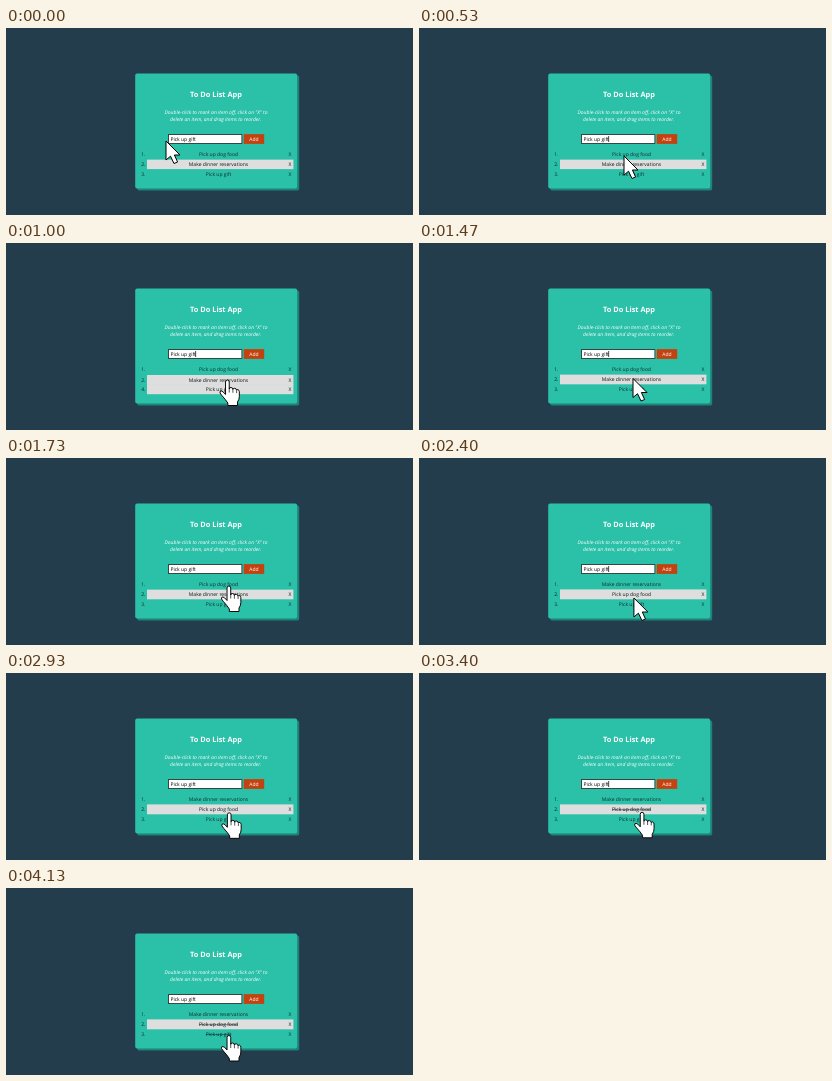
These frames come from a looping animation (407x187 px, 4190 ms). An HTML page:

```html
<!DOCTYPE html>
<html lang="en">
<head>
<meta charset="utf-8">
<title>To Do List App</title>
<style>
  html, body { margin: 0; width: 100%; height: 100%; overflow: hidden; background: #243d4d; }
  svg { display: block; width: 407px; height: 187px; }
  text { font: 5px "Open Sans", sans-serif; fill: #0c1514; text-rendering: geometricPrecision; }
  .mid { text-anchor: middle; }
  .title { font-size: 7.4px; font-weight: 700; fill: #fff; }
  .hint { font-size: 5px; font-style: italic; fill: #fff; }
  .entry { fill: #000; }
  .add { fill: #fff; }
  .cursor path { fill: #fff; stroke: #000; stroke-width: 1; stroke-linejoin: round; }
</style>
</head>
<body>
<svg viewBox="0 0 407 187">
  <rect width="407" height="187" fill="#243d4d"/>
  <rect x="131.2" y="47.4" width="162" height="115" rx="2" fill="#1c8478"/>
  <rect x="129.2" y="45.4" width="162" height="115" rx="2" fill="#2bc0a8"/>
  <text class="mid title" x="210" y="69.2">To Do List App</text>
  <text class="mid hint" x="210" y="86">Double-click to mark an item off, click on "X" to</text>
  <text class="mid hint" x="209.8" y="92.6">delete an item, and drag items to reorder.</text>
  <rect x="162.5" y="106.6" width="73.4" height="8.9" fill="#fff" stroke="#222" stroke-width=".8"/>
  <text class="entry" x="164.4" y="112.8">Pick up gift</text>
  <rect id="caret" x="189.4" y="108" width=".7" height="6" fill="#000"/>
  <rect x="237.7" y="106.1" width="20.5" height="9.8" fill="#c4420f"/>
  <text class="mid add" x="248" y="112.8">Add</text>
  <g id="list"></g>
  <g id="cursor" class="cursor">
    <path id="arrow" d="M0 0V19L4.5 15.2L8 22.5L11.6 21L8.4 14H14Z"/>
    <g id="hand" transform="translate(.6 0) scale(.92 1)">
      <path d="M7 15V2.5a2 2 0 0 1 4 0V9.5q0-1.6 2-1.5t2 2q0-1.5 2-1.2t2 2q.3-1 1.6-.6t1.4 2V17q0 3-2 5.5V26H9.5V23.5Q7 20 3 16L1 13.5Q.5 11.5 2.5 11.5Q4 11.5 7 15Z"/>
      <path d="M11 9.5V13M15 10V13.3M19 11V13.6" stroke-opacity=".7"/>
    </g>
  </g>
</svg>
<script>
const LOOP = 4190, STEP = 1000 / 15, ROW = 9.9, TOP = 121.5;
const $ = id => document.getElementById(id);

// Pointer path: step, x, y
const path = [
  [0, 160, 113], [8, 205, 128], [9, 209, 133], [10, 212, 136], [11, 213, 136.5],
  [15, 212.5, 136.5], [16, 213, 137], [20, 214, 144], [21, 214, 144], [22, 214, 135.5],
  [26, 214, 127.5], [30, 214, 127.5], [33, 213, 137.5], [35, 215, 140], [40, 214.5, 140],
  [47, 214.2, 138.8], [51, 214.2, 138.8], [55, 214, 147]
];

function pointer(k) {
  const i = path.findIndex(p => p[0] > k);
  if (i < 0) return path[path.length - 1].slice(1);
  const [a, b] = [path[i - 1], path[i]];
  const u = (k - a[0]) / (b[0] - a[0]);
  return [a[1] + (b[1] - a[1]) * u, a[2] + (b[2] - a[2]) * u];
}

const within = (k, from, to) => k >= from && k < to;

function makeItem(label) {
  const g = document.createElementNS("http://www.w3.org/2000/svg", "g");
  g.innerHTML = `<rect x="141" width="146.4" height="9.9"/>
    <g><text x="135.2" y="6.8"></text>
    <text class="mid" x="212.5" y="6.8">${label}</text>
    <text class="mid" x="284" y="6.8">X</text></g>`;
  $("list").append(g);
  const [bar, words] = g.children;
  const [num, text] = words.children;
  return { g, bar, words, num, text };
}

const dog = makeItem("Pick up dog food");
const dinner = makeItem("Make dinner reservations");
const gift = makeItem("Pick up gift");

function place(item, n, y, struck) {
  item.g.setAttribute("transform", `translate(0 ${y})`);
  item.bar.setAttribute("fill", n % 2 ? "#2bc0a8" : "#dedede");
  item.words.setAttribute("opacity", n % 2 ? .85 : 1);
  item.num.textContent = n + ".";
  item.text.setAttribute("text-decoration", struck ? "line-through" : "none");
}

function draw(t) {
  const k = Math.floor((t + 4) / STEP);
  const [x, y] = pointer(k);
  const dragDinner = within(k, 15, 22), dragDog = within(k, 31, 36);
  const dragging = dragDinner || dragDog;

  // A dragged row keeps its number; its empty slot also counts as a row.
  const dogY = dragDog ? TOP + y - 127.9 : TOP;
  const swapped = k >= 36 || dragDog && dogY - TOP > ROW / 2;
  const dinnerY = dragDinner ? TOP + ROW + y - 135.9 : swapped ? TOP : TOP + ROW;
  const dogN = k >= 36 ? 2 : 1;
  const dinnerN = k >= 36 ? 1 : dragDog && !swapped ? 3 : 2;

  place(dog, dogN, k >= 36 ? TOP + ROW : dogY, k >= 45);
  place(dinner, dinnerN, dinnerY);
  place(gift, dragging ? 4 : 3, TOP + 2 * ROW, k >= 62);
  const front = dragDinner ? dinner : dog;
  if ($("list").lastChild !== front.g) $("list").append(front.g);

  const caretOn = within(k, 8, 24) || within(k, 32, 40) || within(k, 48, 56);
  $("caret").style.display = caretOn ? "" : "none";

  const isArrow = k < 11 || within(k, 22, 25) || within(k, 36, 40);
  $("arrow").style.display = isArrow ? "" : "none";
  $("hand").style.display = isArrow ? "none" : "";
  $("cursor").setAttribute("transform", `translate(${x} ${y})`);
}

const start = performance.now();
function tick() {
  draw((performance.now() - start) % LOOP);
  requestAnimationFrame(tick);
}
tick();
</script>
</body>
</html>
```
